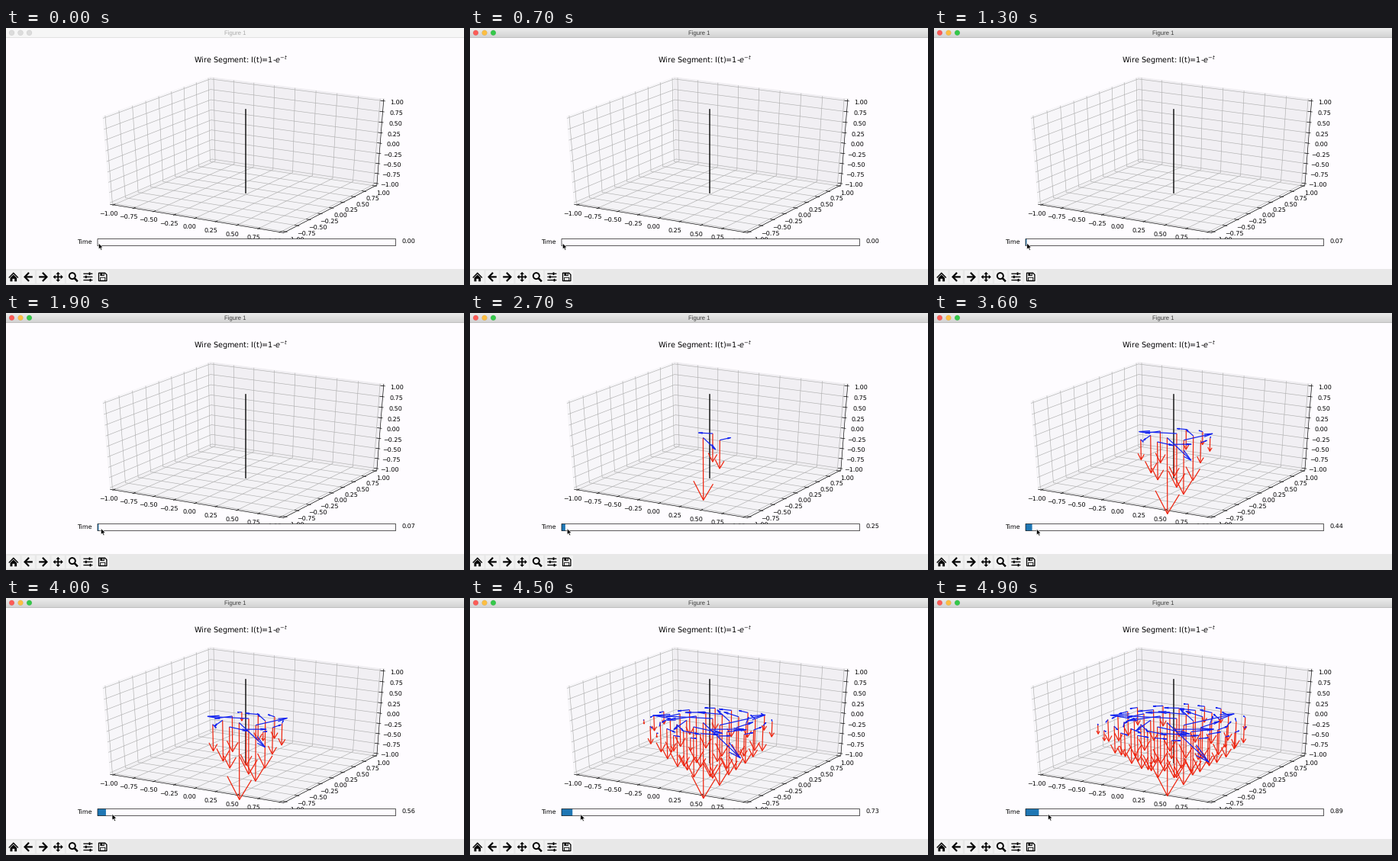
A matplotlib script that plays this animation: 600 by 337 pixels, repeating every 5000 ms.

```python
import numpy as np
import matplotlib.pyplot as plt
from matplotlib.animation import FuncAnimation
from matplotlib.collections import LineCollection
from matplotlib.patches import Circle, Polygon, Rectangle

W, H, DPI = 600, 337, 64
PX = 72 / DPI          # points per stage pixel
PT = 0.8 * PX          # one point of the drawn window's own figure
FRAMES, STEP = 50, 100
PAPER = "#fefcff"

plt.rcParams["path.snap"] = False
plt.rcParams["text.hinting"] = "none"
plt.rcParams["font.family"] = "DejaVu Sans"
fig = plt.figure(figsize=(W / DPI, H / DPI), dpi=DPI, facecolor=PAPER)
ax = fig.add_axes([0, 0, 1, 1])
ax.set(xlim=(0, W), ylim=(H, 0))
ax.axis("off")

# ---- camera: elevation 30, azimuth -60, distance 10 ----
EL, AZ = np.radians([30, -60])
TO_EYE = np.array([np.cos(EL) * np.cos(AZ), np.cos(EL) * np.sin(AZ), np.sin(EL)])
RIGHT = np.array([-np.sin(AZ), np.cos(AZ), 0])
UP = np.cross(TO_EYE, RIGHT)


def project(points):
    u = np.asarray(points, float) / 2
    depth = 10 - u @ TO_EYE
    return np.stack([314 + 2518 * (u @ RIGHT) / depth,
                     162.9 - 1262 * (u @ UP) / depth], axis=-1)


def segments(lines, color, width, zorder, **kw):
    return ax.add_collection(LineCollection(
        lines, colors=color, linewidths=width, zorder=zorder, **kw))


def line(xs, ys, width, color="k", zorder=11, **kw):
    ax.plot(xs, ys, color=color, lw=width * PX, zorder=zorder, **kw)


def poly(points, color="k", zorder=11, **kw):
    return ax.add_patch(Polygon(points, fc=color, zorder=zorder, **kw))


def box(x, y, w, h, color, zorder=11, **kw):
    return ax.add_patch(Rectangle((x, y), w, h, fc=color, zorder=zorder, **kw))


def draw_cube():
    e = 1 + 1 / 24
    panes = [
        ([(-e, -e, -e), (-e, e, -e), (-e, e, e), (-e, -e, e)], 0.95),
        ([(-e, e, -e), (e, e, -e), (e, e, e), (-e, e, e)], 0.90),
        ([(-e, -e, -e), (e, -e, -e), (e, e, -e), (-e, e, -e)], 0.925),
    ]
    for corners, grey in panes:
        shade = (grey, grey - 0.005, grey + 0.008, 0.5)
        poly(project(corners), shade, 1, ec=shade, lw=PT)

    grid, ticks = [], []
    out, inn, far = e + 1 / 60, e - 1 / 30, e + 0.104
    for v in np.linspace(-1, 1, 9):
        grid += [[(v, -e, -e), (v, e, -e), (v, e, e)],
                 [(e, v, -e), (-e, v, -e), (-e, v, e)],
                 [(-e, -e, v), (-e, e, v), (e, e, v)]]
        ticks += [[(v, -out, -e), (v, -inn, -e)],
                  [(out, v, -e), (inn, v, -e)],
                  [(out, e, v), (inn, e, v)]]
        label = f"{v:.2f}".replace("-", "\u2212")
        for pos in [(v, -far, -far), (far, v, -far), (far, far, v)]:
            ax.text(*project(pos), label, size=10 * PT, ha="center", va="top", zorder=4)
    axes = [[(-e, -e, -e), (e, -e, -e)], [(e, -e, -e), (e, e, -e)],
            [(e, e, -e), (e, e, e)]]
    segments([project(g) for g in grid], "#b0b0b0", 0.8 * PT, 2)
    segments([project(s) for s in axes + ticks], "k", 0.8 * PT, 3, capstyle="projecting")
    segments([project([(0, 0, -1), (0, 0, 1)])], "k", 1.7 * PT, 5, capstyle="projecting")


# ---- retarded fields of the wire, sampled in the plane z = 0 ----
GRID = -0.05 + 0.2 * np.arange(-4, 6)
GX, GY = (g.ravel() for g in np.meshgrid(GRID, GRID))
GR = np.hypot(GX, GY)


def fields(t):
    """Origins, E vectors and B vectors at the points the signal has reached."""
    on = GR < t
    x, y, r = GX[on], GY[on], GR[on]
    span = np.arccosh(t / r)
    s = (np.arange(80)[:, None] + 0.5) / 80 * span
    dist = r * np.cosh(s)
    decay = np.exp(dist - t)
    e = span * decay.mean(axis=0)
    b = 0.2 * span * (r * ((1 - decay) / dist**2 + decay / dist)).mean(axis=0)
    zero = np.zeros_like(r)
    return (np.stack([x, y, zero], 1), np.stack([zero, zero, -e], 1),
            np.stack([-y * b / r, x * b / r, zero], 1))


def arrows(origins, vectors):
    """Shaft plus two head strokes, 0.3 of the length and 15 degrees off."""
    c, s = np.cos(np.pi / 12), np.sin(np.pi / 12)
    result = []
    for p, v in zip(origins, vectors):
        flat = np.hypot(v[0], v[1])
        axis = np.array([v[1] / flat, -v[0] / flat, 0]) if flat else np.array([0, 1, 0])
        side = np.cross(axis, v) * s
        tip = p + v
        result += [project([p, tip]),
                   project([tip - 0.3 * (v * c + side), tip,
                            tip - 0.3 * (v * c - side)])]
    return result


def draw_toolbar():
    box(0, 316, W, 21, "#e8e8e8", 10)
    for i in range(7):
        box(1.2 + 19.45 * i, 317.8, 17.2, 17.2, "#f2f2f2", 10.5)
    # home
    poly([(3.3, 327), (9.8, 320.3), (16.3, 327), (15.4, 328), (9.8, 322.5), (4.2, 328)])
    poly([(5.5, 327.6), (9.8, 323.5), (14.1, 327.6), (14.1, 332.3), (11.2, 332.3),
          (11.2, 328.8), (8.4, 328.8), (8.4, 332.3), (5.5, 332.3)])
    # back and forward
    for x, d in [(29.3, 1), (48.7, -1)]:
        line([x - 4 * d, x + 5.5 * d], [326.4] * 2, 2.2, solid_capstyle="butt")
        line([x, x - 4.7 * d, x], [321.6, 326.4, 331.2], 2.2, solid_joinstyle="miter")
    # pan
    cx, cy = 68.2, 326.4
    line([cx - 4.5, cx + 4.5], [cy, cy], 1.7)
    line([cx, cx], [cy - 4.5, cy + 4.5], 1.7)
    for dx, dy in [(1, 0), (-1, 0), (0, 1), (0, -1)]:
        tip = np.array([cx + 6.5 * dx, cy + 6.5 * dy])
        back, side = np.array([dx, dy]) * 2.9, np.array([dy, dx]) * 2.8
        poly([tip, tip - back + side, tip - back - side])
    # zoom
    ax.add_patch(Circle((86.8, 325.1), 4, fc="none", ec="k", lw=1.9 * PX, zorder=11))
    line([90, 93], [328.4, 331.5], 2.5)
    # subplots
    for y, knob in [(322.2, 109.5), (326.4, 104.8), (330.6, 110.5)]:
        line([101.4, 113.4], [y, y], 1.3, solid_capstyle="butt")
        box(knob - 0.9, y - 1.8, 1.8, 3.6, "k")
    # save
    poly([(121.5, 321.2), (129.6, 321.2), (131.9, 323.5), (131.9, 331.6), (121.5, 331.6)],
         "#f2f2f2", ec="k", lw=1.3 * PX)
    box(123.4, 321.2, 5.4, 3.8, "k")
    box(126.3, 321.9, 1.4, 2.3, "#f2f2f2")
    box(123.6, 327.2, 6.2, 4, "none", ec="k", lw=0.9 * PX)


# ---- slider ----
X0, X1, Y0, Y1 = 120, 510.5, 276.5, 285.6
UNIT = (X1 - X0) / 20


def draw_slider():
    box(X0, Y0, X1 - X0, Y1 - Y0, PAPER, 6)
    box(X0, Y0, X1 - X0, Y1 - Y0, "none", 8, ec="k", lw=0.8 * PT)
    ax.text(112.2, 281.1, "Time", size=10 * PT, ha="right", va="center", zorder=8)


draw_cube()
draw_slider()
draw_toolbar()
ax.text(307.5, 44.8, r"Wire Segment: I(t)=1-$e^{-t}$", size=12 * PT,
        ha="center", va="baseline", zorder=4)

bar = [box(0, y, W, 1.02, "w", 10) for y in range(13)]
dots = [ax.add_patch(Circle((x, 6.3), 3.4, lw=0.4 * PX, zorder=11)) for x in (7.5, 19, 30.5)]
window_title = ax.text(300, 9.4, "Figure 1", size=7.7 * PX, ha="center",
                       va="baseline", family="Liberation Sans", zorder=11)
electric = segments([], "#ee220c", 1.5 * PT, 5.2)
magnetic = segments([], "#1122f0", 1.5 * PT, 5.3)
fill = box(X0, Y0, 0, Y1 - Y0, "#1f77b4", 7)
value_text = ax.text(518.2, 281.1, "", size=10 * PT, va="center", zorder=8)

CURSOR = np.array([(0, 0), (0, 8.2), (1.9, 6.5), (3.2, 9.4), (4.6, 8.8),
                   (3.3, 6), (5.7, 5.8)])
cursor = poly(CURSOR, "k", 20, ec="w", lw=0.6 * PX)

# The arrows are redrawn one slider event later than the number.
EVENT_MS = [0, 1000, 2200, 2400, 3000, 3300, 3600, 3900, 4200, 4500, 4700, 4900]
EVENT_VALUE = [0, 0.07, 0.20, 0.25, 0.33, 0.40, 0.44, 0.56, 0.70, 0.73, 0.815, 0.89]
CURSOR_MS = [1200, 1900, 2700, 3600, 4500, 4900]
CURSOR_X = [121.3, 124.4, 127.2, 134.4, 144.8, 149.4]
CURSOR_Y = [282, 282.3, 282.5, 283, 283.4, 283]
FOCUS_MS = 300


def set_focus(active):
    top, bottom = (0.915, 0.825) if active else (0.965, 0.965)
    for i, strip in enumerate(bar):
        grey = top + (bottom - top) * i / 12
        if i == 12:
            grey -= 0.08
        strip.set_facecolor((grey,) * 3)
    colors = ("#fc5b57", "#fdbe41", "#35c84a") if active else ("#dcdcdc",) * 3
    for dot, color in zip(dots, colors):
        dot.set_facecolor(color)
        dot.set_edgecolor("#00000022")
    window_title.set_color("#3c3c3c" if active else "#ababab")


def update(frame):
    ms = frame * STEP
    event = np.searchsorted(EVENT_MS, ms, side="right") - 1
    value = EVENT_VALUE[event]
    set_focus(ms >= FOCUS_MS)
    value_text.set_text(f"{value:.2f}")
    fill.set_width(value * UNIT)
    origins, e, b = fields(EVENT_VALUE[max(event - 1, 0)])
    electric.set_segments(arrows(origins, e))
    magnetic.set_segments(arrows(origins, b))
    cursor.set_xy(CURSOR + [np.interp(ms, CURSOR_MS, CURSOR_X),
                            np.interp(ms, CURSOR_MS, CURSOR_Y)])
    return [*bar, *dots, window_title, electric, magnetic, fill, value_text, cursor]


anim = FuncAnimation(fig, update, frames=FRAMES, interval=STEP, repeat=True,
                     repeat_delay=0, blit=False)
plt.show()
```
